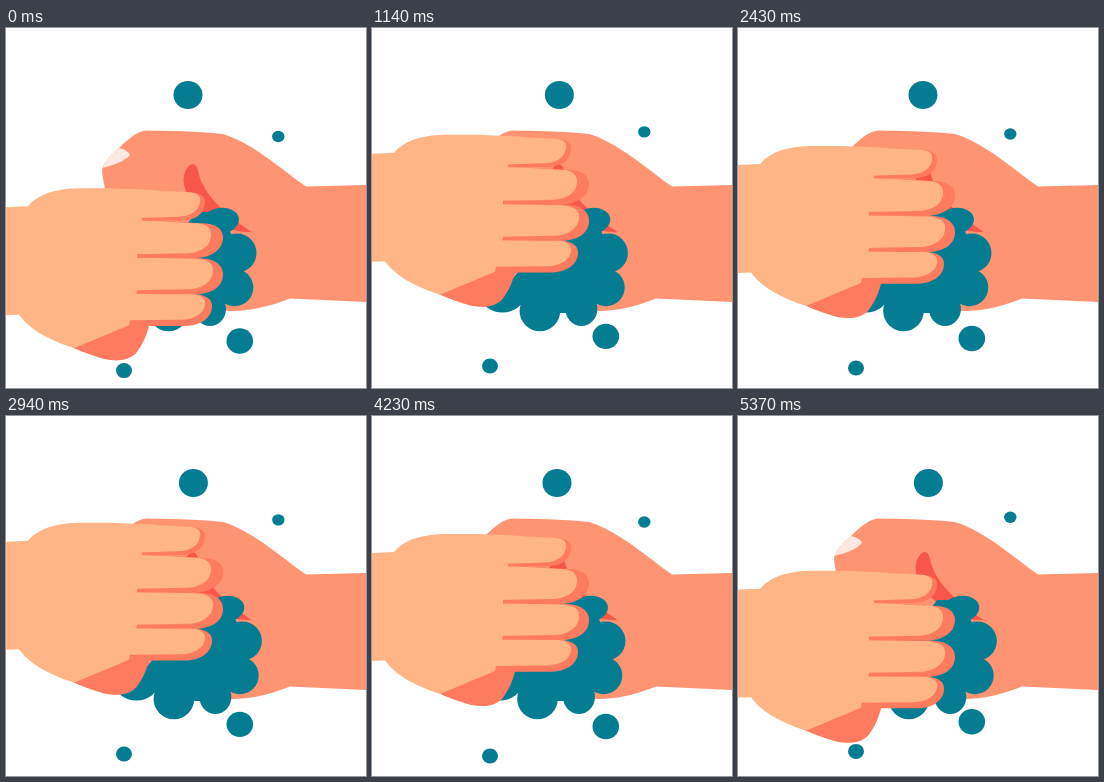
Write an HTML page that moves like this. It is 360 by 360 pixels and loops after 5.4 s.

```html
<!DOCTYPE html>
<html lang="en">
<head>
<meta charset="utf-8">
<title>Hand washing</title>
<style>
  html, body { margin: 0; height: 100%; overflow: hidden; background: #fff; }
  svg { display: block; width: 100%; height: 100%; }
</style>
</head>
<body>
<svg viewBox="0 0 360 360">
  <!-- back hand -->
  <path fill="#ff9473" d="M362 157L300 158.500C276 142 247 115 217 106C190 103 160 103 140 102.500C130 104 122 111 113 120C106 126 99 133 96.500 140C95 145 98 152 99 162L130 262L200 279C225 287 255 282 284 270.500L362 274Z"/>
  <path fill="#fde8e2" d="M113 120C118 121 122 123 124 127C118 134 107 137 96.500 140C99 133 106 126 113 120Z"/>
  <path fill="#f9564a" d="M177.500 152C178 142 183 136 187 136C191 137 192 142 193 147C199 168 219 186 245.500 204C230 205 215 199 202 189C188 178 178 166 177.500 152Z"/>

  <g fill="#047c91">
    <g id="foam">
      <ellipse cx="182" cy="67" rx="14.500" ry="14"/>
      <path d="M191 184L214 184L235 225L230 262L205 285L163 285L121 268Z"/>
      <ellipse cx="214.500" cy="193" rx="18.500" ry="13" transform="rotate(-8 214 193)"/>
      <circle cx="231" cy="225" r="19.500"/>
      <circle cx="228.500" cy="259.500" r="18.800"/>
      <ellipse cx="204" cy="281" rx="16" ry="17"/>
      <circle cx="162.500" cy="283" r="20.300"/>
      <ellipse cx="125" cy="266.500" rx="22" ry="18"/>
    </g>
    <g id="drops">
      <ellipse cx="272.300" cy="108.500" rx="6.200" ry="5.700"/>
      <ellipse cx="233.800" cy="313" rx="13.300" ry="12.700"/>
      <ellipse cx="118" cy="342.600" rx="8" ry="7.500"/>
    </g>
  </g>

  <g id="hand">
    <!-- shaded side of the palm and fingers -->
    <g fill="#ff7b5f">
      <path d="M67 319.500L123 290L143.500 296C141 306 137 316 130 325C122 333 110 333 99 331C88 328 77 324 67 319.500Z"/>
      <path d="M130 163L184 164C196 165 200 169 199 175C198 186 190 191.500 176 192.300H130Z"/>
      <path d="M130 191L195 195C210 195 217 201 217 209C217 222 205 229 190 230H130Z"/>
      <path d="M130 228L196 230C211 231 217 238 217 246C217 258 207 265 190 266.300H130Z"/>
      <path d="M123 264L190 266C202 267 206 272 206 278C206 288 197 297 180 297.700H123Z"/>
    </g>
    <!-- lit side -->
    <g fill="#ffb586">
      <path d="M-2 179L22 178C32 167 45 161 72 160L105 160L150 162L136 190V196L131 226V262L124 292L123 297L68 320C38 310 22 299 13 286.500L-2 287Z"/>
      <path d="M125 161L184 164C193 165 195 169 194 174C192 184 184 188 172 188.500L125 190Z"/>
      <path d="M125 192L155 193L188 195C200 194.500 206 200 205 208C204 219 194 224 182 225L125 226Z"/>
      <path d="M125 229.500L165 230L190 230.500C203 231 208 236 207 244C206 254 195 261 182 261L125 262Z"/>
      <path d="M120 265.500L165 266L186 266C196 266.500 200 271 199 277C197 287 187 291 175 291.500L120 292Z"/>
    </g>
  </g>
</svg>
<script>
  const LOOP = 1800, HALF = 225, LOWEST = 26.5;
  const [foam, drops, hand] = ["foam", "drops", "hand"].map(id => document.getElementById(id));
  const move = (el, x, y) => el.setAttribute("transform", `translate(${x} ${y})`);
  // soft start and stop, symmetric about the middle
  const ease = x => (3 * x ** 2 + 8 * x ** 3 - 15 * x ** 4 + 6 * x ** 5) / 2;

  function draw(now) {
    const t = now % LOOP;
    const drift = t / LOOP;
    move(foam, 8.5 * drift, 0);
    move(drops, 0, -7.3 * drift);

    // rub: up for one half, down for the next
    const step = (t - LOWEST + LOOP) / HALF % 2;
    const lift = ease(step < 1 ? step : 2 - step);
    move(hand, 0, 1.6 - 55 * lift);
    requestAnimationFrame(draw);
  }
  draw(performance.now());
</script>
</body>
</html>
```
